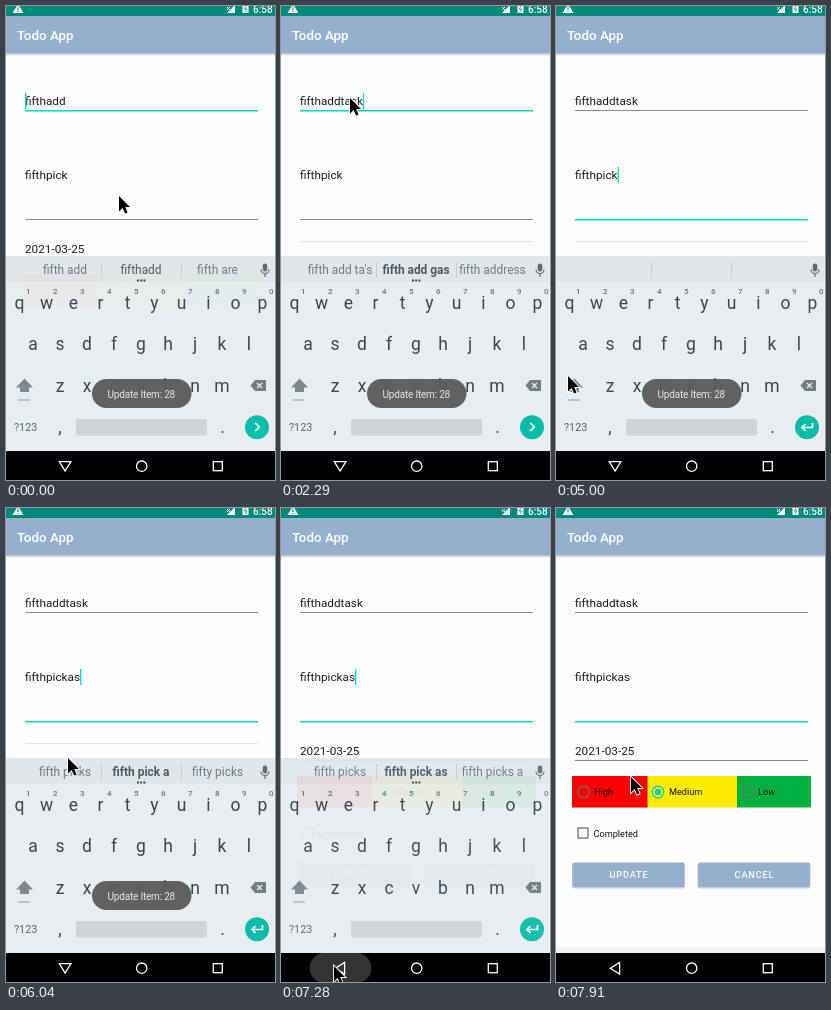
Animation, 269 px wide and 474 px high, one loop 8 s. Source, as an HTML page:

```html
<!DOCTYPE html>
<html lang="en">
<head>
<meta charset="utf-8">
<title>Todo App</title>
<style>
  html, body { margin: 0; width: 100%; height: 100%; overflow: hidden; background: #fefefe; }
  svg { display: block; width: 100%; height: 100%; font-family: Roboto, sans-serif; }
  .mid { text-anchor: middle; }
  .field { font-size: 11.77px; fill: #1c1c1c; }
  .label { font-size: 9.16px; fill: #111; }
  .button { font-size: 9.16px; font-weight: 500; letter-spacing: .85px; fill: #fff; text-anchor: middle; }
  .key { font-size: 17.5px; fill: #37474f; text-anchor: middle; }
  .digit { font-size: 8px; font-weight: 500; fill: #66747b; text-anchor: middle; }
  .hint { font-size: 11.9px; fill: #6d7b82; text-anchor: middle; }
</style>
</head>
<body>
<svg viewBox="0 0 269 474">
  <defs>
    <linearGradient id="shade" x2="0" y2="1">
      <stop stop-color="#b4b8bc"/><stop offset="1" stop-color="#fefefe"/>
    </linearGradient>
  </defs>
  <rect width="269" height="474" fill="#fefefe"/>

  <g id="form">
    <rect y="439" width="269" height="6" fill="#f1f1f1"/>
    <text class="field" id="title" x="19" y="99"></text>
    <rect id="titleLine" x="19" y="104" width="233"/>
    <text class="field" id="note" x="19" y="173"></text>
    <rect id="noteLine" x="19" y="213" width="233"/>
    <text class="field" x="19" y="247">2021-03-25</text>
    <rect x="19" y="252" width="233" height="1" fill="#8a8a8a"/>
    <rect x="16" y="268" width="76" height="31.5" fill="#f00"/>
    <rect x="91.5" y="268" width="90" height="31.5" fill="#ffeb00"/>
    <rect x="181" y="268" width="74" height="31.5" fill="#00b140"/>
    <g fill="none" stroke="#6f6f6f" stroke-width="1.3">
      <circle cx="27.5" cy="284" r="5.8"/>
      <circle cx="102" cy="284" r="5.8" stroke="#00d0b5"/>
      <circle cx="192" cy="284" r="5.8"/>
      <rect x="22" y="320" width="10" height="10"/>
    </g>
    <circle cx="102" cy="284" r="3.2" fill="#00d0b5"/>
    <text class="label" x="38" y="287.3">High</text>
    <text class="label" x="113" y="287.3">Medium</text>
    <text class="label" x="202" y="287.3">Low</text>
    <text class="label" x="37.5" y="328.5">Completed</text>
    <g fill="#c9ced4">
      <rect x="16" y="355" width="113" height="25.5" rx="2.5"/>
      <rect x="141.5" y="355" width="113" height="25.5" rx="2.5"/>
    </g>
    <g fill="#95afcc">
      <rect x="16.5" y="354.5" width="112" height="24.5" rx="2"/>
      <rect x="142" y="354.5" width="112" height="24.5" rx="2"/>
    </g>
    <text class="button" x="73" y="370">UPDATE</text>
    <text class="button" x="198.5" y="370">CANCEL</text>
  </g>

  <g id="cover">
    <rect y="226" width="269" height="25" fill="#fefefe"/>
    <rect x="19" y="235" width="233" height="1" fill="#e4e4e4"/>
  </g>
  <rect id="compose" x="19" y="101" height="1" fill="#333"/>
  <rect id="caret" width="1.3" height="16" fill="#00d9c3"/>
  <path id="handle" d="M0 0L4.8 3.2A6.5 6.5 0 1 1 -4.8 3.2Z" fill="#00dcc6"/>

  <rect width="269" height="10" fill="#00897b"/>
  <rect y="10" width="269" height="37" fill="#95afcc"/>
  <rect y="47" width="269" height="3" fill="url(#shade)"/>
  <path d="M12-2L17.5 7H6.5Z" fill="#fff"/>
  <path d="M12 1V4M12 5V6" stroke="#00897b" stroke-width="1.2"/>
  <path d="M221 7L229-1V7Z" fill="#fff"/>
  <path d="M221 1L224 4M224 1L221 4" stroke="#fff"/>
  <path d="M236.5-2H242.5V7H236.5Z" fill="#fff"/>
  <path d="M240 0L238 3H241L239 6" fill="none" stroke="#00897b" stroke-width=".8"/>
  <text x="247" y="6.5" font-size="10" font-weight="500" fill="#fff">6:58</text>
  <text x="11" y="34" font-size="13.4" font-weight="500" fill="#fff">Todo App</text>

  <g id="keyboard">
    <rect y="250" width="269" height="195" fill="#e9edf0"/>
    <rect y="250" width="269" height="26" fill="#e2e6e8"/>
    <path d="M95.5 256V272M175.5 256V272" stroke="#c6ccd0"/>
    <g id="hints">
      <text class="hint" x="59" y="268"></text>
      <text class="hint" x="135" y="268" style="fill:#4a5a63"></text>
      <text class="hint" x="211.5" y="268"></text>
      <path d="M131 274.5h2m1.2 0h2m1.2 0h2" stroke="#37474f" stroke-width="2"/>
    </g>
    <g fill="none" stroke="#5d6c74" stroke-width="1.2">
      <rect x="257.3" y="258" width="3.4" height="7" rx="1.7" fill="#5d6c74"/>
      <path d="M255 263.5a4 4 0 0 0 8 0M259 267.5V271"/>
    </g>
    <g id="keys"></g>
    <path d="M18.5 372.5L27 381.5H23V386H14V381.5H10Z" fill="#7b888f"/>
    <path d="M12 394H24" stroke="#8d999f"/>
    <path d="M244.5 379.5L249 374H260V385H249Z" fill="#6f7d84"/>
    <path d="M251 377l5 5m0-5l-5 5" stroke="#e9edf0" stroke-width="1.3"/>
    <text x="8" y="425" font-size="10.8" fill="#55646c">?123</text>
    <rect x="70" y="413" width="131" height="16.5" rx="2" fill="#cfd4d7"/>
    <circle cx="251" cy="421.3" r="12" fill="#08bda8"/>
    <path id="action" fill="none" stroke="#fff" stroke-width="1.7"/>
  </g>

  <g id="toast">
    <rect x="86" y="373" width="99.5" height="29" rx="14.5" fill="#5a5a5a" opacity=".95"/>
    <text class="mid" x="135.3" y="391.5" font-size="10" letter-spacing="-.2" fill="#e6e6e6">Update Item: 28</text>
  </g>

  <rect y="445" width="269" height="29"/>
  <rect id="ripple" x="28.5" y="445" width="62" height="30" rx="15" fill="#333"/>
  <g fill="none" stroke="#fff" stroke-width="1.3">
    <path id="back" d="M53.3 455.7H64.9L59.1 465Z"/>
    <circle cx="135.7" cy="460.2" r="5.2"/>
    <rect x="207.3" y="455.7" width="9" height="9"/>
  </g>
  <path id="mouse" d="M0 0V15.5L3.6 12 6.1 17.6 8.6 16.5 6.2 11H11Z" stroke="#fff" stroke-width="1.8" paint-order="stroke"/>
</svg>
<script>
const LOOP = 8000, STEP = 208;
const $ = id => document.getElementById(id);
const set = (id, attrs) => { for (const a in attrs) $(id).setAttribute(a, attrs[a]); };
const show = (id, on) => set(id, { opacity: +on });

const letter = (cls, x, y, s) => `<text class="${cls}" x="${x}" y="${y}">${s}</text>`;
const row = (chars, x, y) => [...chars].map((c, i) => letter('key', x + i * 27, y, c)).join('');
$('keys').innerHTML =
  row('qwertyuiop', 13.5, 303) + row('asdfghjkl', 27, 344) + row('zxcvbnm', 54, 385.5) +
  [...'1234567890'].map((d, i) => letter('digit', 22.3 + i * 27, 288, d)).join('') +
  letter('key', 54, 426.5, ',') + letter('key', 216.5, 426.5, '.');

// Pointer stops: step, x, y
const route = [[0, 113, 190], [1, 107, 176], [4, 69, 92], [14, 69, 92], [16, 70, 167], [21, 70, 167],
  [24, 12, 370], [26, 48, 454], [27, 50, 454], [29, 62, 250], [32, 53, 458], [36, 53, 458], [38, 75, 269]];

// Suggestions from each step on
const hintSets = [[0, 'fifth add', 'fifthadd', 'fifth are'], [4, 'fifth are', 'fifth add', 'fifty add'],
  [11, "fifth add ta's", 'fifth add gas', 'fifth address'], [16],
  [28, 'fifth picks', 'fifth pick a', 'fifty picks'], [30, 'fifth picks', 'fifth pick as', 'fifth picks a']];

const focused = { height: 1.5, fill: '#00dcc6' };
const blurred = { height: 1, fill: '#8a8a8a' };

function pointer(k) {
  const n = route.findIndex(p => p[0] >= k);
  const b = route[n], a = route[Math.max(0, n - 1)];
  const f = b === a ? 0 : (k - a[0]) / (b[0] - a[0]);
  return [1, 2].map(i => a[i] + (b[i] - a[i]) * f);
}

function draw(k) {
  const inNote = k >= 16;
  $('title').textContent = 'fifthadd' + 'task'.slice(0, Math.max(0, k - 7));
  $('note').textContent = 'fifthpick' + 'as'.slice(0, Math.max(0, k - 26));
  set('titleLine', inNote ? blurred : focused);
  set('noteLine', inNote ? focused : blurred);

  const width = $(inNote ? 'note' : 'title').getComputedTextLength();
  const caretX = 19 + (k < 4 ? 0 : width);
  set('caret', { x: caretX, y: inNote ? 161 : 87 });
  show('caret', k !== 20 && k !== 21 && k < 38);
  set('handle', { transform: `translate(${caretX + .5} ${inNote ? 177.5 : 103.5})` });
  show('handle', (k >= 4 && k < 8) || k === 16 || k === 17);
  set('compose', { width });
  show('compose', k >= 4 && k < 8);

  const [, ...words] = hintSets.findLast(h => h[0] <= k);
  show('hints', words.length);
  document.querySelectorAll('.hint').forEach((e, i) => e.textContent = words[i] || '');
  document.querySelectorAll('.hint')[1].style.fontWeight = k < 4 ? 400 : 600;
  set('action', { d: inNote ? 'M256.5 417V421.5H246M249.5 418L246 421.5 249.5 425' : 'M249.2 417L253.2 421 249.2 425' });

  show('cover', k > 0 && k < 35);
  set('keyboard', { opacity: k === 0 ? .985 : k < 35 ? 1 : k < 36 ? .94 : 0 });
  set('toast', { opacity: Math.min(1, Math.max(0, (32 - k) / 2)) });
  set('ripple', { opacity: { 34: .5, 35: 1, 36: .5 }[k] || 0 });
  set('back', { transform: `rotate(${k < 35 ? 0 : 90} 59.1 460.2)` });
  set('mouse', { transform: `translate(${pointer(k)})` });
}

let start;
function tick(now) {
  start ??= now;
  draw(Math.floor((now - start) % LOOP / STEP));
  requestAnimationFrame(tick);
}
draw(0);
requestAnimationFrame(tick);
</script>
</body>
</html>
```
